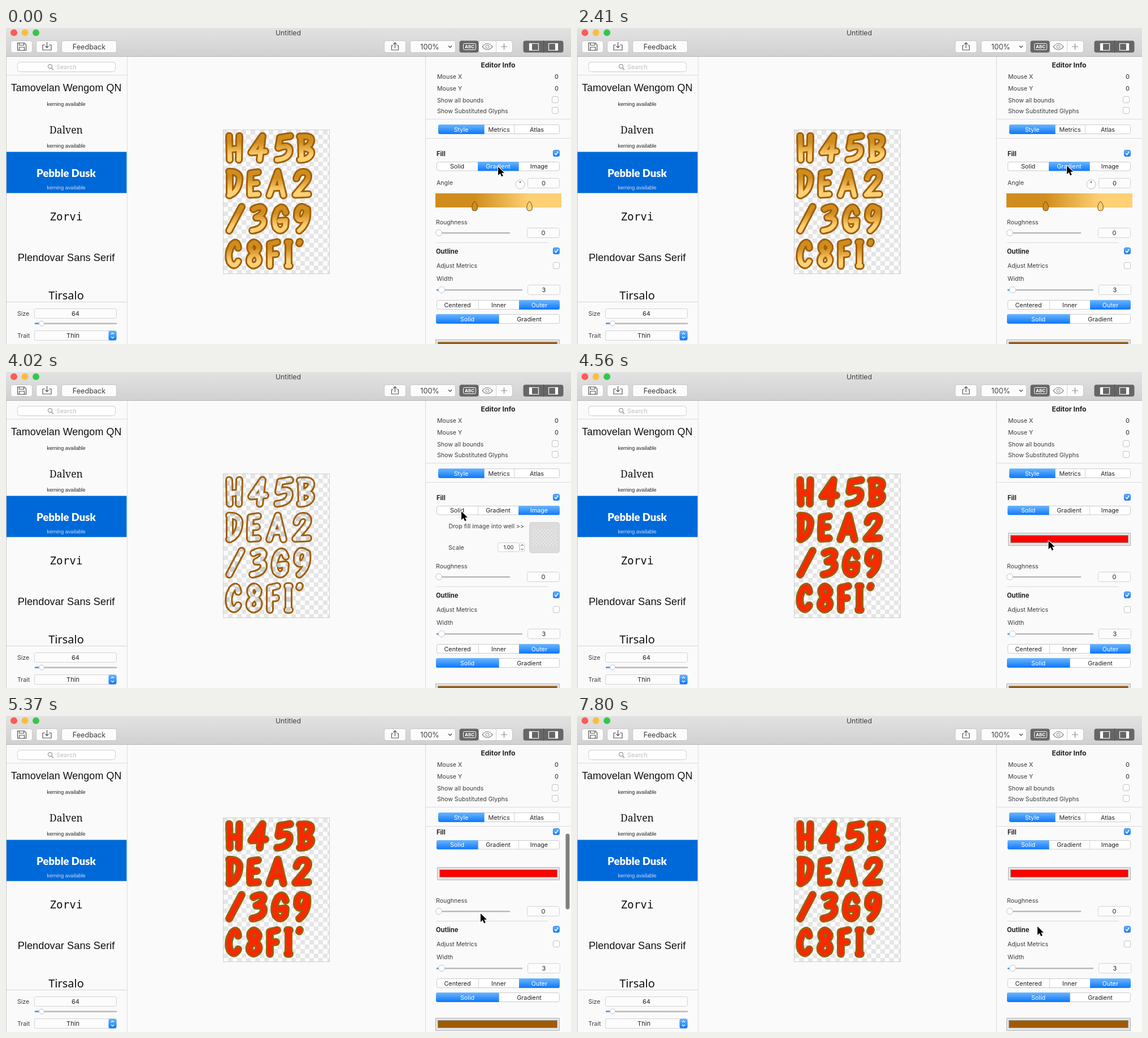
These frames come from a looping animation (1000x560 px, 8000 ms). An HTML page with a canvas:

```html
<!DOCTYPE html>
<html lang="en">
<head>
<meta charset="utf-8">
<title>Glyph editor</title>
<style>
html, body { margin: 0; width: 100%; height: 100%; overflow: hidden; background: #fafafa; }
canvas { display: block; width: 1000px; height: 560px; }
</style>
</head>
<body>
<canvas id="stage" width="1000" height="560"></canvas>
<script>
const c = document.getElementById('stage').getContext('2d');
const LOOP = 8000;
const UI = 'Inter, sans-serif';
const BROWN = '#a05a00';

// Centre lines of the brush letters, one list per row of the atlas
const rows = [
  [183.5, ['M395 8L396 50M413 8L412 50M396 32L412 30',
    'M454 8L434 37L459 35M454 8L449 50',
    'M503 8L485 11L482 29Q503 21 502 35Q500 48 480 50',
    'M522 9L523 50M520 9Q543 6 540 18Q537 27 526 29Q543 31 540 40Q536 50 520 50']],
  [246.5, ['M396 9L396 50M395 8Q416 8 413 25Q410 45 395 50',
    'M446 9L433 11Q431 30 432 49L446 48M432 29L444 28',
    'M466 50L481 8L491 50M471 37L487 36',
    'M514 20Q518 6 530 9Q541 15 528 30L512 49L535 48']],
  [309, ['M395 50L417 8',
    'M438 12Q453 4 456 13Q456 21 443 27Q458 26 456 37Q452 48 436 50',
    'M495 18Q491 3 481 13Q472 28 477 44Q486 56 494 43L495 32L484 33',
    'M532 13Q522 2 516 15Q512 31 522 31Q530 29 533 12Q536 36 519 50']],
  [371.5, ['M411 18Q409 3 400 13Q391 28 396 43Q404 55 411 42',
    'M447 16Q440 3 433 13Q430 22 440 28Q451 36 446 45Q437 54 431 44Q429 34 440 28Q448 22 447 16Z',
    'M480 8L467 11L467 50M467 30L478 29',
    'M498 8H502M500 8V50M498 50H502',
    'M520 7.5L519 10']]
].map(([y, list]) => [y, list.map(d => new Path2D(d))]);

// Cursor tip: step, x, y
const moves = [[0, 871, 246], [1, 871, 246], [2, 858, 245], [3, 825, 243], [4, 812, 242], [6, 812, 242],
  [7, 828, 243], [8, 860, 244], [9, 867, 244], [10, 890, 244], [11, 935, 245], [13, 943, 245],
  [14, 880, 246], [15, 806, 247], [16, 800, 246], [18, 869, 352], [19, 869, 352], [20, 840, 350],
  [22, 767, 344], [24, 795, 344], [25, 805, 344], [27, 766, 344], [28, 782, 354], [29, 815, 373]];

function text(s, x, y, size = 10.6, align = 'left', color = '#3c3c3c', weight = 400, font = UI) {
  c.font = `${weight} ${size}px ${font}`;
  c.textAlign = align;
  c.fillStyle = color;
  c.fillText(s, x, y + size * .36);
}

function rect(x, y, w, h, color) {
  c.fillStyle = color;
  c.fillRect(x, y, w, h);
}

function box(x, y, w, h, r, fill, line) {
  c.beginPath();
  c.roundRect(x + .5, y + .5, w - 1, h - 1, r);
  c.fillStyle = fill;
  c.fill();
  if (line) stroke(line, 1);
}

function stroke(color, width) {
  c.strokeStyle = color;
  c.lineWidth = width;
  c.stroke();
}

function path(d, color, width = 1.2) {
  c.strokeStyle = color;
  c.lineWidth = width;
  c.stroke(new Path2D(d));
}

function dot(x, y, r, fill, line) {
  c.beginPath();
  c.arc(x, y, r, 0, 7);
  c.fillStyle = fill;
  c.fill();
  if (line) stroke(line, 1);
}

function shade(x0, y0, x1, y1, ...stops) {
  const g = c.createLinearGradient(x0, y0, x1, y1);
  stops.forEach(([at, color]) => g.addColorStop(at, color));
  return g;
}

const blue = (y, h) => shade(0, y, 0, y + h, [0, '#6cb5fb'], [1, '#0d78fb']);

function field(x, y, w, h, value, size = 11) {
  box(x, y, w, h, 3, '#fcfcfc', '#d2d2d2');
  text(value, x + w / 2, y + h / 2 + .5, size, 'center', '#222');
}

function check(x, y, on) {
  box(x, y, 12, 12, 2.5, on ? blue(y, 12) : '#fff', on ? '#2f86ee' : '#c4c4c4');
  if (on) path(`M${x + 3} ${y + 6}l2.3 2.8l4-5.8`, '#fff', 1.5);
}

function segments(edges, y, h, labels, chosen) {
  const x = edges[0], w = edges[edges.length - 1] - x;
  box(x, y, w, h, 3, '#fff', '#cbcbcb');
  edges.slice(1, -1).forEach(e => rect(e, y + 1, 1, h - 2, '#d4d4d4'));
  c.save();
  c.beginPath();
  c.roundRect(x, y, w, h, 3);
  c.clip();
  rect(edges[chosen], y, edges[chosen + 1] - edges[chosen] + .5, h, blue(y, h));
  c.restore();
  labels.forEach((s, i) => text(s, (edges[i] + edges[i + 1]) / 2, y + h / 2 + .3, 10.8, 'center', i === chosen ? '#fff' : '#222'));
}

function slider(x0, x1, y, knob, r = 5.5) {
  rect(x0, y - 1, x1 - x0, 2.5, '#b9b9b9');
  rect(x0, y - 1, knob - x0, 2.5, '#3b99fc');
  dot(knob, y, r, '#fff', '#c3c3c3');
}

function well(x, y, w, color) {
  box(x, y, w, 23, 0, '#e6e6e6', '#b0b0b0');
  rect(x + 4, y + 4, w - 8, 14, '#8d8d8d');
  rect(x + 5, y + 5, w - 10, 12, color);
}

function checker(x, y, w, h, size, a, b) {
  rect(x, y, w, h, a);
  c.fillStyle = b;
  for (let j = 0; j * size < h; j++)
    for (let i = j % 2; i * size < w; i += 2)
      c.fillRect(x + i * size, y + j * size, Math.min(size, w - i * size), Math.min(size, h - j * size));
}

function tile(size, a, b) {
  const t = document.createElement('canvas'), k = t.getContext('2d');
  t.width = t.height = size * 2;
  k.fillStyle = a;
  k.fillRect(0, 0, size * 2, size * 2);
  k.fillStyle = b;
  k.fillRect(0, 0, size, size);
  k.fillRect(size, size, size, size);
  return c.createPattern(t, 'repeat');
}
const emptyFill = tile(9, '#f8f8f8', '#cecece');

function titleBar() {
  rect(0, 0, 1000, 51, shade(0, 0, 0, 50, [0, '#e2e2e2'], [1, '#d1d1d1']));
  rect(0, 50, 1000, 1, '#b5b5b5');
  ['#fc5b57', '#fdbc40', '#34c84a'].forEach((color, i) => dot(14 + i * 19.5, 8.3, 6, color));
  text('Untitled', 499.5, 9, 12.3, 'center', '#3d3d3d');
  [[8, 39], [53, 39], [98, 98], [669, 39], [715, 81], [836, 61]].forEach(([x, w]) => box(x, 22, w, 22, 4, '#fcfcfc', '#c6c6c6'));
  path('M20.5 26.5h12l3 3v10h-15zM23.5 26.5v4h8v-4M23.5 39v-5h9v5', '#555');
  path('M69 30h-4v9h15v-9h-4M72.5 25v10M69.5 32l3 3l3-3', '#555');
  text('Feedback', 147, 33, 12.6, 'center');
  path('M685.5 31h-3v8h12v-8h-3M688.5 36v-10M685.5 29l3-3l3 3', '#555');
  text('100%', 750, 33, 12.6, 'center');
  path('M783 31.5l3 3l3-3', '#555', 1.4);
  box(802, 22, 35, 22, 4, '#666');
  box(809, 27, 23, 12, 2, '#666', '#fff');
  text('ABC', 820.5, 33.3, 8, 'center', '#fff', 700);
  rect(867, 23, 1, 20, '#d0d0d0');
  path('M843 33Q852 22 861 33Q852 44 843 33Z', '#8a8a8a');
  dot(852, 33, 3, '#fcfcfc', '#8a8a8a');
  path('M876 33h11M881.5 27.5v11', '#8a8a8a');
  box(915, 22, 72, 22, 4, '#666');
  rect(951, 22, 1, 22, '#555');
  path('M926.5 27.5h16v12h-16zM960.5 27.5h16v12h-16z', '#fff');
  rect(927, 28, 4, 11, '#fff');
  rect(972, 28, 4, 11, '#fff');
}

function sidebar() {
  rect(214, 51, 1, 509, '#dedede');
  box(20, 60, 174, 18, 4, '#fff', '#cfcfcf');
  dot(78, 68, 3.6, '#fff', '#777');
  path('M80.7 70.8l3.3 3.6', '#777');
  text('Search', 89, 69.5, 10.8, 'left', '#bdbdbd');
  rect(1, 83, 213, 1, '#dcdcdc');
  rect(1, 219.5, 212.5, 73, '#0069d9');
  const name = (s, y, size, font, color = '#111', weight = 400) => text(s, 106.5, y, size, 'center', color, weight, font);
  const sans = '"Liberation Sans", sans-serif';
  name('Tamovelan Wengom QN', 106, 18, sans);
  name('Dalven', 181, 17.5, '"Noto Serif", serif');
  name('Pebble Dusk', 257, 18.5, 'Lato, sans-serif', '#fff', 900);
  name('Zorvi', 334, 19.3, '"DejaVu Sans Mono", monospace');
  name('Plendovar Sans Serif', 406, 18.3, sans);
  name('Tirsalo', 474, 20, '"Noto Sans", sans-serif');
  [135, 209, 283].forEach(y => name('kerning available', y, 9.1, sans, y > 280 ? '#c9def6' : '#222'));
  rect(1, 485, 213, 75, '#fafafa');
  rect(1, 485, 213, 1, '#d5d5d5');
  text('Size', 20, 506);
  field(50, 497, 146, 18, '64');
  slider(51, 196, 523.5, 63, 4.5);
  text('Trait', 20, 545);
  box(50, 536, 146, 18, 3, '#fcfcfc', '#d2d2d2');
  text('Thin', 118.5, 545, 11, 'center', '#222');
  box(181, 536, 15, 18, 3, blue(536, 18));
  path('M186 543l2.5-2.7l2.5 2.7M186 547l2.5 2.7l2.5-2.7', '#fff');
  rect(0, 51, 1, 509, '#c8c8c8');
}

function atlas(mode, rough) {
  checker(385, 181, 187, 254, 8, '#fcfcfc', '#e5e5e5');
  c.strokeStyle = '#d0d0d0';
  c.lineWidth = 1;
  c.strokeRect(384.5, 180.5, 188, 255);
  const ink = [
    '#ff2600',
    shade(0, 5, 0, 54, [.28, '#d08d1d'], [.76, '#ffd074']),
    emptyFill
  ][mode];
  c.lineCap = c.lineJoin = 'round';
  for (const [y, list] of rows) {
    c.save();
    c.translate(0, y);
    for (const p of list) {
      c.lineWidth = 14;
      c.strokeStyle = mode ? '#a05f08' : '#94620a';
      c.stroke(p);
      c.lineWidth = 8;
      if (rough) {
        // ragged fill edge
        c.save();
        c.lineCap = 'butt';
        c.setLineDash([1, 12 - rough]);
        c.strokeStyle = '#f0c99a';
        c.stroke(p);
        c.restore();
        c.lineWidth = 7;
      }
      c.strokeStyle = ink;
      c.stroke(p);
    }
    c.restore();
  }
  c.lineCap = 'butt';
  c.lineJoin = 'miter';
}

function info() {
  rect(742, 51, 1, 509, '#d9d9d9');
  text('Editor Info', 871, 66, 12.2, 'center', '#222', 700);
  ['Mouse X', 'Mouse Y', 'Show all bounds', 'Show Substituted Glyphs'].forEach((s, i) => {
    const y = [86, 107, 128, 147][i];
    text(s, 763, y);
    if (i < 2) text('0', 978, y, 11, 'right', '#222');
    else check(966, y - 7, false);
  });
  rect(743, 161, 257, 1, '#dcdcdc');
  segments([765, 846, 899, 980], 171, 17, ['Style', 'Metrics', 'Atlas'], 0);
  rect(743, 195, 257, 1, '#dcdcdc');
}

function marker(x, color) {
  const p = new Path2D(`M${x} 307Q${x + 6} 313 ${x + 4.5} 321Q${x + 4} 324 ${x} 324Q${x - 4} 324 ${x - 4.5} 321Q${x - 6} 313 ${x} 307Z`);
  c.fillStyle = color;
  c.fill(p);
  c.strokeStyle = '#6b4a12';
  c.lineWidth = 1;
  c.stroke(p);
}

const fillOptions = [
  () => well(763, 285, 217, '#f00'),
  () => {
    text('Angle', 762, 274.5);
    dot(910, 277, 8, '#fff', '#c0c0c0');
    dot(910, 273, 1.3, '#555');
    field(923, 266, 57, 18, '0');
    rect(760, 293, 223, 25, shade(760, 0, 983, 0, [.31, '#d08d1d'], [.74, '#ffd074']));
    marker(829.5, '#d08d1d');
    marker(926.5, '#ffd074');
  },
  () => {
    text('Drop fill image into well >>', 917, 273.5, 10.6, 'right');
    box(926, 266, 54, 55, 4, '#dcdcdc', '#d2d2d2');
    checker(931, 278, 44, 30, 3, '#e6e6e6', '#d8d8d8');
    text('Scale', 783, 311);
    field(870, 302, 39, 17, '1.00', 9.3);
    box(909, 302, 9, 17, 3, '#fff', '#cfcfcf');
    path('M911.5 308l2-2.5l2 2.5M911.5 313l2 2.5l2-2.5', '#444', 1);
  }
];

function stylePane(mode, rough, scroll) {
  c.save();
  c.beginPath();
  c.rect(743, 196, 257, 364);
  c.clip();
  c.translate(0, -scroll);
  text('Fill', 762, 222.5, 11.2, 'left', '#222', 700);
  check(968, 216, true);
  segments([762, 835, 907, 980], 237, 16.5, ['Solid', 'Gradient', 'Image'], mode);
  fillOptions[mode]();
  text('Roughness', 761, 344);
  slider(761, 892, 363, 766 + rough * 5.5);
  field(922, 354, 58, 18, String(rough));
  rect(761, 380, 198, 1, '#d8d8d8');
  text('Outline', 761, 395.5, 11.2, 'left', '#222', 700);
  check(968, 389, true);
  text('Adjust Metrics', 762, 421);
  check(968, 415, false);
  text('Width', 762, 444.5);
  slider(762, 914, 464, 771);
  field(923, 455, 58, 18, '3');
  segments([762, 836, 908, 980], 482, 17, ['Centered', 'Inner', 'Outer'], 2);
  segments([761, 872, 980], 507, 17, ['Solid', 'Gradient'], 0);
  well(760, 552, 220, BROWN);
  c.restore();
}

function cursor(step) {
  const i = Math.max(1, moves.findIndex(m => m[0] >= step));
  const [s0, x0, y0] = moves[i - 1], [s1, x1, y1] = moves[i];
  const k = (step - s0) / (s1 - s0);
  c.save();
  c.translate(x0 + (x1 - x0) * k, y0 + (y1 - y0) * k);
  const arrow = new Path2D('M0 0V15L3.6 11.8L6.2 17.2L8.8 16L6.3 10.8H11Z');
  c.lineJoin = 'round';
  c.strokeStyle = '#fff';
  c.lineWidth = 2;
  c.stroke(arrow);
  c.fillStyle = '#000';
  c.fill(arrow);
  c.restore();
}

function draw(now) {
  const step = Math.floor((now % LOOP + 11) / 268.6);
  const mode = step < 4 ? 1 : step < 9 ? 0 : step < 12 ? 1 : step < 16 ? 2 : 0;
  const rough = { 23: 2, 24: 5, 25: 7, 26: 3 }[step] || 0;
  const scroll = step < 18 ? 0 : step < 19 ? 12 : 17;
  rect(0, 0, 1000, 560, '#fafafa');
  sidebar();
  titleBar();
  atlas(mode, rough);
  info();
  stylePane(mode, rough, scroll);
  if (step >= 18 && step < 23) {
    c.globalAlpha = step < 22 ? 1 : .5;
    box(990, 191 + scroll, 8, 135, 3.5, '#808080');
    c.globalAlpha = 1;
  }
  cursor(step);
}

const start = performance.now();
function tick() {
  draw(performance.now() - start);
  requestAnimationFrame(tick);
}
tick();
</script>
</body>
</html>
```
